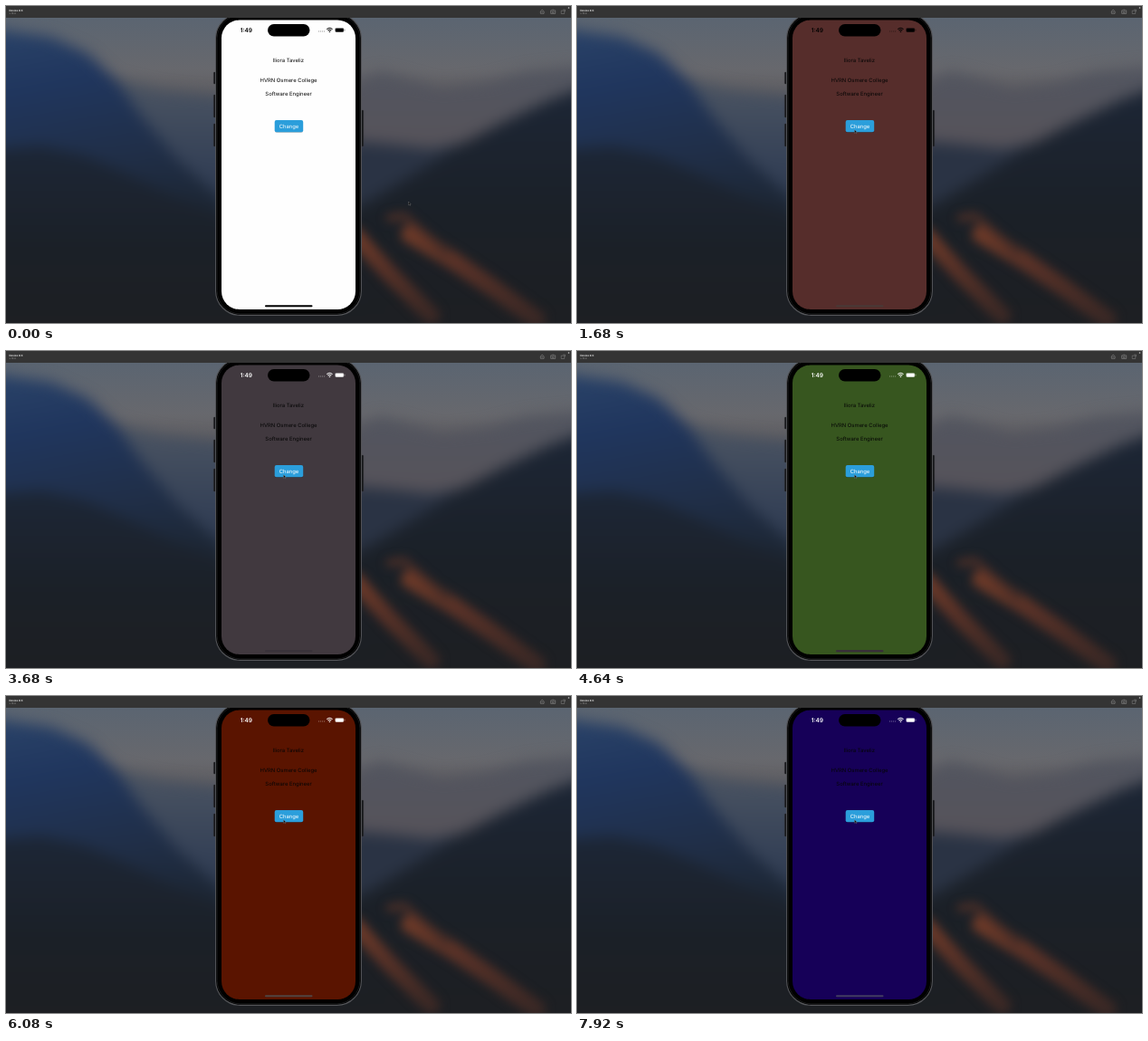
An HTML page that plays this animation: 624x350 px, repeating every 8000 ms.

```html
<!DOCTYPE html>
<html lang="en">
<head>
<meta charset="utf-8">
<title>Background colour changer</title>
<style>
  html, body { margin: 0; width: 100%; height: 100%; overflow: hidden; background: #1c1f25; }
  svg { display: block; width: 100vw; height: 100vh; }
  text { font-family: Inter, Roboto, sans-serif; text-rendering: geometricPrecision; }
  .label { font-size: 5.9px; text-anchor: middle; }
</style>
</head>
<body>
<svg viewBox="0 0 624 350" preserveAspectRatio="none">
  <defs>
    <linearGradient id="sky" x2="0" y2="1">
      <stop offset="0" stop-color="#586472"/>
      <stop offset=".2" stop-color="#67686d"/>
      <stop offset=".34" stop-color="#5b5759"/>
      <stop offset=".5" stop-color="#3c404a"/>
    </linearGradient>
    <linearGradient id="blueRidge" x2=".2" y2="1">
      <stop offset="0" stop-color="#2b4469"/>
      <stop offset=".3" stop-color="#20365e"/>
      <stop offset=".65" stop-color="#202f49"/>
      <stop offset="1" stop-color="#1c2531"/>
    </linearGradient>
    <linearGradient id="haze" x2="0" y2="1">
      <stop offset="0" stop-color="#4c5563"/>
      <stop offset=".5" stop-color="#364257"/>
      <stop offset="1" stop-color="#25324a"/>
    </linearGradient>
    <linearGradient id="ground" x2="0" y2="1">
      <stop offset="0" stop-color="#1c2636"/>
      <stop offset=".5" stop-color="#1b2027"/>
      <stop offset="1" stop-color="#1d1e21"/>
    </linearGradient>
    <linearGradient id="farRidge" x2="0" y2="1">
      <stop offset="0" stop-color="#515560"/>
      <stop offset=".55" stop-color="#56535a"/>
      <stop offset="1" stop-color="#2d3443"/>
    </linearGradient>
    <linearGradient id="ember" x2="1" y2="1">
      <stop offset="0" stop-color="#6b3928"/>
      <stop offset=".4" stop-color="#573127"/>
      <stop offset="1" stop-color="#3a2825"/>
    </linearGradient>
    <filter id="soft" x="-10%" y="-10%" width="120%" height="120%" color-interpolation-filters="sRGB"><feGaussianBlur stdDeviation="8"/></filter>
    <filter id="glow" x="-30%" y="-30%" width="160%" height="160%" color-interpolation-filters="sRGB"><feGaussianBlur stdDeviation="5.5"/></filter>
  </defs>

  <!-- Blurred mountain wallpaper -->
  <rect width="624" height="350" fill="url(#sky)"/>
  <g filter="url(#soft)">
    <path d="M110 78L170 92L230 98L320 110V260H100Z" fill="url(#haze)"/>
    <path d="M-30 22L50 34L90 52L122 82L150 122L190 170L240 215L240 270H-30Z" fill="url(#blueRidge)"/>
    <path d="M370 92L412 72L436 78L480 90L530 84L575 72L654 64V220H370Z" fill="url(#farRidge)"/>
    <path d="M370 148L420 152L470 158L510 150V230H370Z" fill="#2a3344"/>
    <path d="M654 84L600 104L550 128L500 154L450 186L400 216L370 230V380H654Z" fill="url(#ground)"/>
    <path d="M-30 160L40 154L90 166L130 184L180 208L240 232L400 250V380H-30Z" fill="url(#ground)"/>
  </g>
  <g filter="url(#glow)" fill="none" stroke="url(#ember)" stroke-linecap="round" stroke-linejoin="round">
    <path d="M386 254L424 296L470 342" stroke-width="19"/>
    <path d="M446 252L492 280L536 310L586 346" stroke-width="20"/>
    <path d="M424 234L440 232L486 272" stroke-width="9" opacity=".6"/>
  </g>

  <!-- Phone -->
  <g fill="#17181a" stroke="#35363a" stroke-width=".4">
    <rect x="229.3" y="73" width="3" height="13" rx=".8"/>
    <rect x="229.3" y="98" width="3" height="25" rx=".8"/>
    <rect x="229.3" y="130" width="3" height="25" rx=".8"/>
    <rect x="391.8" y="115" width="3" height="40" rx=".8"/>
  </g>
  <rect x="231.6" y="8.6" width="160.8" height="332.8" rx="27" fill="#000" stroke="#55565a" stroke-width="1.1"/>
  <rect x="233.2" y="10.2" width="157.6" height="329.6" rx="25.5" fill="none" stroke="#161718" stroke-width="1"/>
  <rect id="screen" x="238" y="15.5" width="148" height="319.5" rx="20"/>
  <rect x="289" y="20" width="46.5" height="13.6" rx="6.8"/>
  <g id="status">
    <text x="265.3" y="29" font-size="6.5" font-weight="600" text-anchor="middle">1:49</text>
    <path d="M345 28h1.1m.9 0h1.1m.9 0h1.1m.9 0h1.1" stroke="currentColor" stroke-width="1" opacity=".4"/>
    <path d="M354.3 25.6Q357.4 22.9 360.5 25.6M355.5 27.1Q357.4 25.5 359.3 27.1" fill="none" stroke="currentColor" stroke-width="1.1"/>
    <path d="M356.3 28.1Q357.4 27.2 358.5 28.1L357.4 29.3Z"/>
    <rect x="363.3" y="24.2" width="10" height="4.8" rx="1.4" opacity=".45"/>
    <rect x="363.9" y="24.7" width="8.8" height="3.8" rx="1"/>
    <rect x="373.7" y="25.8" width=".7" height="1.6" rx=".3" opacity=".5"/>
  </g>
  <g class="label" fill="#050505">
    <text x="311.8" y="62.3">Iliora Taveliz</text>
    <text x="312" y="84.1">HVRN Osmere College</text>
    <text x="312" y="99.4">Software Engineer</text>
  </g>
  <rect x="297" y="127" width="31" height="13" rx="2" opacity=".22"/>
  <rect x="296.7" y="126" width="31.5" height="13.3" rx="2" fill="#2b9edb"/>
  <text class="label" x="312.5" y="135" fill="#fff">Change</text>
  <rect id="homeBar" x="286" y="330.3" width="52.5" height="2" rx="1"/>

  <!-- Simulator toolbar -->
  <rect width="624" height="13" fill="#343434"/>
  <text x="3.5" y="5.9" font-size="2.9" font-weight="700" fill="#e4e4e4">Device 8 X</text>
  <text x="3.5" y="9.2" font-size="2.6" fill="#a5a5a5">v 10.4</text>
  <g fill="none" stroke="#858585" stroke-width=".7">
    <path d="M590.3 8.3V5.8L592.2 4.2L594.1 5.8V8.3Z M591.5 6.5h1.4"/>
    <path d="M601.7 4.9h1.2l.5-.7h1.6l.5.7h1.2v3.5h-5Z"/><circle cx="604.2" cy="6.6" r=".9"/>
    <path d="M613.2 5.1h3.5v3.4h-3.5Z M615.2 4.1h2.3v2.2" opacity=".75"/>
  </g>
  <circle cx="621.5" cy="2" r=".8" fill="#c8c8c8"/>

  <path id="cursor" d="M0 0V3.8L.9 3L1.5 4.4L2.1 4.1L1.5 2.8H2.7Z" fill="#080808" stroke="#b8b8b8" stroke-width=".25"/>
</svg>
<script>
  const LOOP = 8000;
  const STATUS_DELAY = 240;
  const themes = [
    { at: 0,    screen: '#fefefe', bar: '#000000', status: '#000000' },
    { at: 1600, screen: '#562d2b', bar: '#493936', status: '#ffffff' },
    { at: 2480, screen: '#41393f', bar: '#38323a', status: '#ffffff' },
    { at: 3760, screen: '#37561f', bar: '#392a3c', status: '#ffffff' },
    { at: 5280, screen: '#5a1400', bar: '#504542', status: '#ffffff' },
    { at: 6400, screen: '#5b1e52', bar: '#482943', status: '#ffffff' },
    { at: 7520, screen: '#160058', bar: '#423d61', status: '#ffffff' }
  ];
  const [screenBox, homeBar, statusBar, cursor] =
    ['screen', 'homeBar', 'status', 'cursor'].map(id => document.getElementById(id));

  const themeAt = time => themes.filter(theme => theme.at <= Math.max(0, time)).pop();
  const progress = (time, start, end) => {
    const p = Math.min(1, Math.max(0, (time - start) / (end - start)));
    return p * p * (3 - 2 * p);
  };

  function draw(now) {
    const time = now % LOOP;
    const theme = themeAt(time);
    const status = themeAt(time - STATUS_DELAY).status;
    const move = progress(time, 400, 1200);
    screenBox.setAttribute('fill', theme.screen);
    homeBar.setAttribute('fill', theme.bar);
    statusBar.setAttribute('fill', status);
    statusBar.setAttribute('color', status);
    cursor.setAttribute('transform', `translate(${444.5 - 138 * move} ${216 - 79.5 * move})`);
    requestAnimationFrame(draw);
  }
  draw(performance.now());
</script>
</body>
</html>
```
